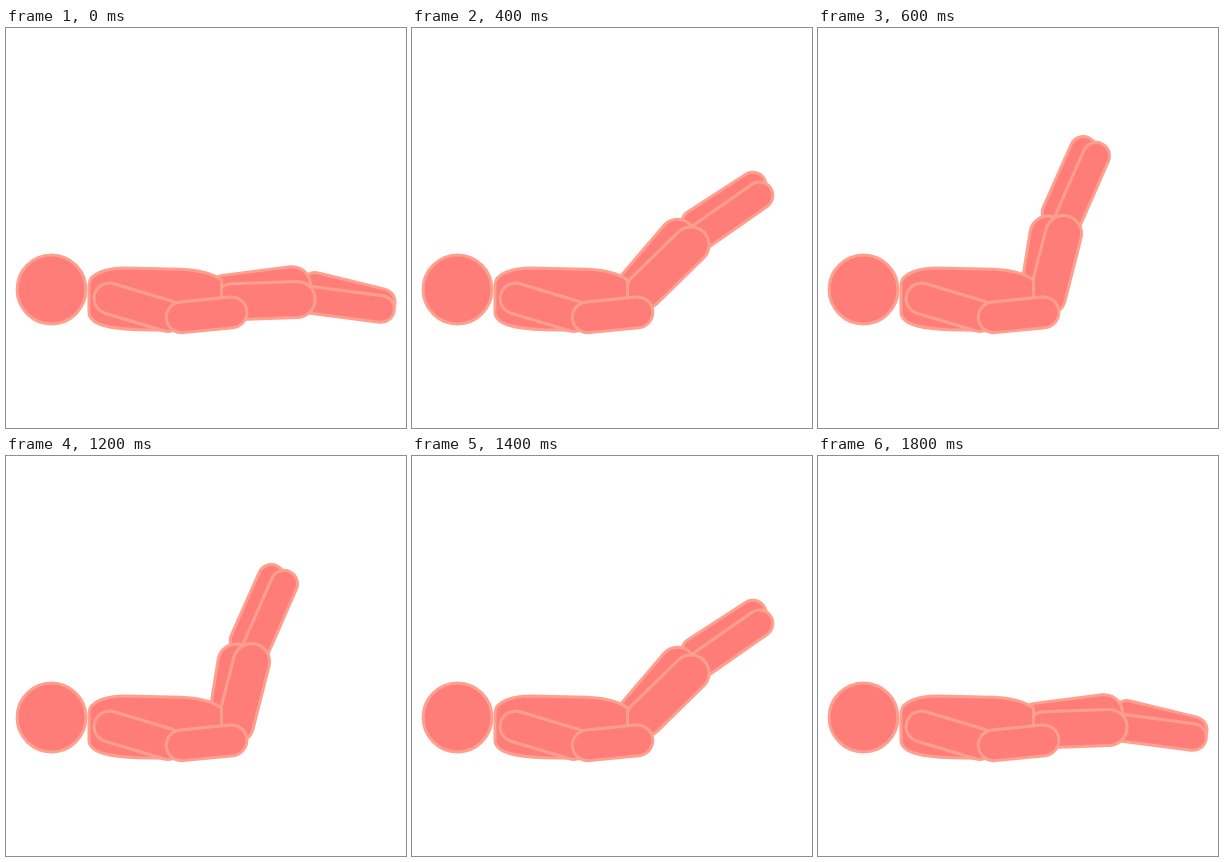
Write an HTML page with a canvas that moves like this. It is 400 px wide and 400 px high and loops after 2 s.

```html
<!DOCTYPE html>
<html lang="en">
<head>
<meta charset="utf-8">
<title>Leg raise</title>
<style>
  html, body { margin: 0; width: 100%; height: 100%; overflow: hidden; background: #fff; }
  canvas { display: block; width: 400px; height: 400px; }
</style>
</head>
<body>
<canvas id="stage" width="400" height="400"></canvas>
<script>
const ctx = document.getElementById('stage').getContext('2d');
const FILL = '#ff7d79', EDGE = '#ff9f8e', LINE = 3;
const THIGH = 19.6, CALF = 14.9, ARM = 16.9;
const STEP = 200;
const RAD = Math.PI / 180;

// Near knee position and turn of the legs in degrees, from flat to raised
const lifts = [
  { x: 291, y: 271.5, turn: 0 },
  { x: 292, y: 243, turn: 20.5 },
  { x: 279, y: 217, turn: 42.3 },
  { x: 245.5, y: 205.7, turn: 73.7 },
  { x: 223.5, y: 200, turn: 95.8 }
];

// A rounded limb starting at x, y; the angle points down from the horizontal
function limb(x, y, length, angle, radius) {
  ctx.lineCap = 'round';
  for (const [color, r] of [[EDGE, radius], [FILL, radius - LINE]]) {
    ctx.strokeStyle = color;
    ctx.lineWidth = 2 * r;
    ctx.beginPath();
    ctx.moveTo(x, y);
    ctx.lineTo(x + length * Math.cos(angle * RAD), y + length * Math.sin(angle * RAD));
    ctx.stroke();
  }
}

function outlined(path) {
  ctx.fillStyle = FILL;
  ctx.strokeStyle = EDGE;
  ctx.lineWidth = LINE;
  ctx.fill(path);
  ctx.stroke(path);
}

// Both legs turn as one piece; the far calf sags a little when they lie flat
function legs({ x, y, turn }) {
  const sag = 6 * Math.cos(turn * RAD) ** 4;
  ctx.save();
  ctx.translate(x, y);
  ctx.rotate(-turn * RAD);
  limb(18, -13.5, 68.5, 7.6 + sag, CALF);
  limb(-4.7, -14.7, 68, 172.8, THIGH);
  limb(15, 0.5, 69.5, 7.4, CALF);
  limb(0, 0, 65, 178, THIGH);
  ctx.restore();
}

const head = new Path2D();
head.arc(45.5, 261.5, 34.4, 0, 2 * Math.PI);

const torso = new Path2D(
  'M83 257 C83 245 102 240 119 240 L175 241.3 C194 242 207 246 215.5 252 ' +
  'V268 C215 288 205 302 180 302.5 L132 301.7 C108 300.7 83 298 83 284 Z');

function draw(now) {
  const step = Math.floor(now / STEP) % (2 * lifts.length);
  ctx.clearRect(0, 0, 400, 400);
  legs(lifts[Math.min(step, 2 * lifts.length - 1 - step)]);
  outlined(torso);
  outlined(head);
  limb(103.5, 270.5, 61, 16.7, ARM);
  limb(175.7, 289.3, 50, -5.7, ARM);
  requestAnimationFrame(draw);
}
requestAnimationFrame(draw);
</script>
</body>
</html>
```
